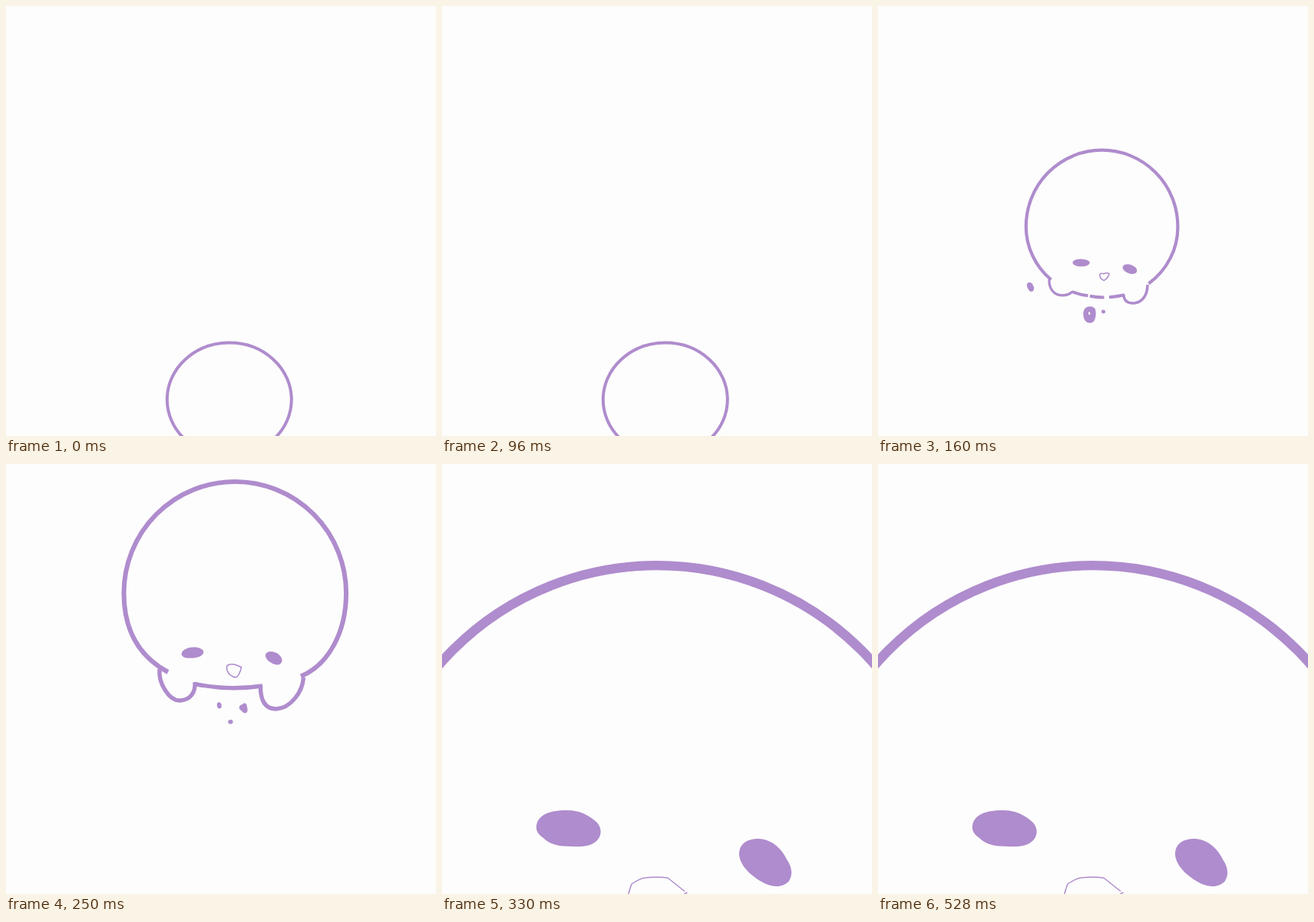
These frames come from a looping animation (560x560 px, 0.66 s). An HTML page:

```html
<!DOCTYPE html>
<html lang="en">
<head>
<meta charset="utf-8">
<title>Bouncing blob</title>
<style>
  html, body { margin: 0; width: 100%; height: 100%; overflow: hidden; background: #fdfdfd; }
  svg { display: block; width: 100%; height: 100%; }
  .line { fill: none; stroke: #af8ccd; stroke-linejoin: round; }
  .fill { fill: #af8ccd; }
</style>
</head>
<body>
<svg id="stage" viewBox="0 0 560 560"></svg>
<script>
const line = (width, d) => `<path class="line" stroke-width="${width}" d="${d}"/>`;
const fill = d => `<path class="fill" d="${d}"/>`;
const oval = (x, y, rx, ry, turn = 0) =>
  `<ellipse class="fill" cx="${x}" cy="${y}" rx="${rx}" ry="${ry}" transform="rotate(${turn} ${x} ${y})"/>`;

const rising = line(4, 'M209.8 512.5A81 74 0 0 1 371.8 512.5A81 74 0 0 1 209.8 512.5Z');

const small = [
  line(4.2, 'M225.5 356.5A99 93 0 0 1 192.8 287A98.8 99.3 0 0 1 390.4 287A99 93 0 0 1 352.5 361.5'),
  line(4, 'M252.5 372Q263 376 273.5 377.3M276 377.8Q286 379.7 294.5 379.6M301 379.3Q311 378.6 321 376.3'),
  line(3.2, 'M223 355C222 368 229 377 240 376.8C246 376.8 250 375 253 372'),
  line(3.6, 'M320 376C320 385 327 388 335 386.8C345 385 351 376 351 363'),
  oval(264.6, 334.3, 11.2, 4.9, 1),
  oval(328, 342.6, 9.8, 5.8, 20),
  line(1.5, 'M288.7 349.5Q290 347.5 294 348.7Q298 346.8 301 348.5Q300 354 294.5 357.4Q289 356 288.7 349.5Z'),
  fill('M194.5 361C197 359 201 360.5 202 364C204 367 203.5 371.5 200 372C196 371.5 196 369 195 367.5C193.5 365.5 193.7 362.5 194.5 361Z'),
  fill('M270 393.5C274 390 281 390.5 283 395C284.5 401 283.5 409 279.5 412C275 414 270.5 412 268.5 407.5C266.5 402 267 396.5 270 393.5Z'),
  '<ellipse cx="275.2" cy="400.3" rx="1.1" ry="2" fill="#fdfdfd"/>',
  oval(293.5, 398, 2.5, 2.5)
].join('');

const medium = [
  line(6, 'M211 271C172 250 153.5 216 153.5 168A144.7 145 0 0 1 443 168C443 218 421 261 384 276.5'),
  line(5.6, 'M246 286.5Q290 295.5 334 289'),
  line(5.4, 'M200 267C198 286 213 309 227 308C240 307 247 298 246 284'),
  line(5.4, 'M331.5 288C331 309 338 319 352 319C370 318 386 298 387.5 278'),
  fill('M228.5 247C230 241.5 237 238.5 245 238.5C252 238.5 257.5 241.5 257.3 245.5C256 250 250 252 243 252.7C234 253.5 228.5 251.5 228.5 247Z'),
  fill('M338 248C339 244 345 243 351 245.5C356 247.5 360 252.5 359.5 256C359 260.5 355 262.5 350 261C343 258.5 337 253.5 338 248Z'),
  line(1.6, 'M287.5 264C288 261 294 260 299 261.5L306.5 264.5C305.5 269 304.5 274 300.5 277.5C295 278.5 287 273 287.5 264Z'),
  oval(277.7, 314.4, 2.9, 4.1, -10),
  fill('M304 316C304.5 313 308 314 309 312C312 310.5 314 313 313.7 316C315.5 320 314.5 324.5 311.5 324.5C309 324.5 307 321.5 305.5 320.5C303.7 319 303.5 317.5 304 316Z'),
  oval(292.4, 335.8, 3.2, 2.8)
].join('');

const close = [
  line(12.4, 'M-96 508A376 376 0 0 1 656 508'),
  fill('M123 471C125 457 140 451 161 451C177 450 192 457 202 467C209 475 208 486 200 492C193 498 181 499 167 498C152 498 139 495 132 487C126 483 122 478 123 471Z'),
  fill('M387 506C388 494 398 488 412 488C428 488 442 500 449 515C456 525 457 535 452 543C445 551 434 552 422 547C405 539 386 523 387 506Z'),
  line(1.5, 'M242.5 561Q245 552 247 547Q259 539 266 538.8Q280 537 294 539L316 556.5M315.5 560L319.5 558')
].join('');

const poses = [[160, rising], [250, small], [330, medium], [660, close]];
const stage = document.getElementById('stage');
stage.innerHTML = poses.map(([, art]) => `<g>${art}</g>`).join('');
const groups = [...stage.children];

function draw(ms) {
  const t = ms % 660;
  const current = poses.findIndex(([end]) => t < end);
  groups.forEach((g, i) => g.setAttribute('visibility', i === current ? 'visible' : 'hidden'));
}

const start = performance.now();
function tick() {
  draw(performance.now() - start);
  requestAnimationFrame(tick);
}
tick();
</script>
</body>
</html>
```
